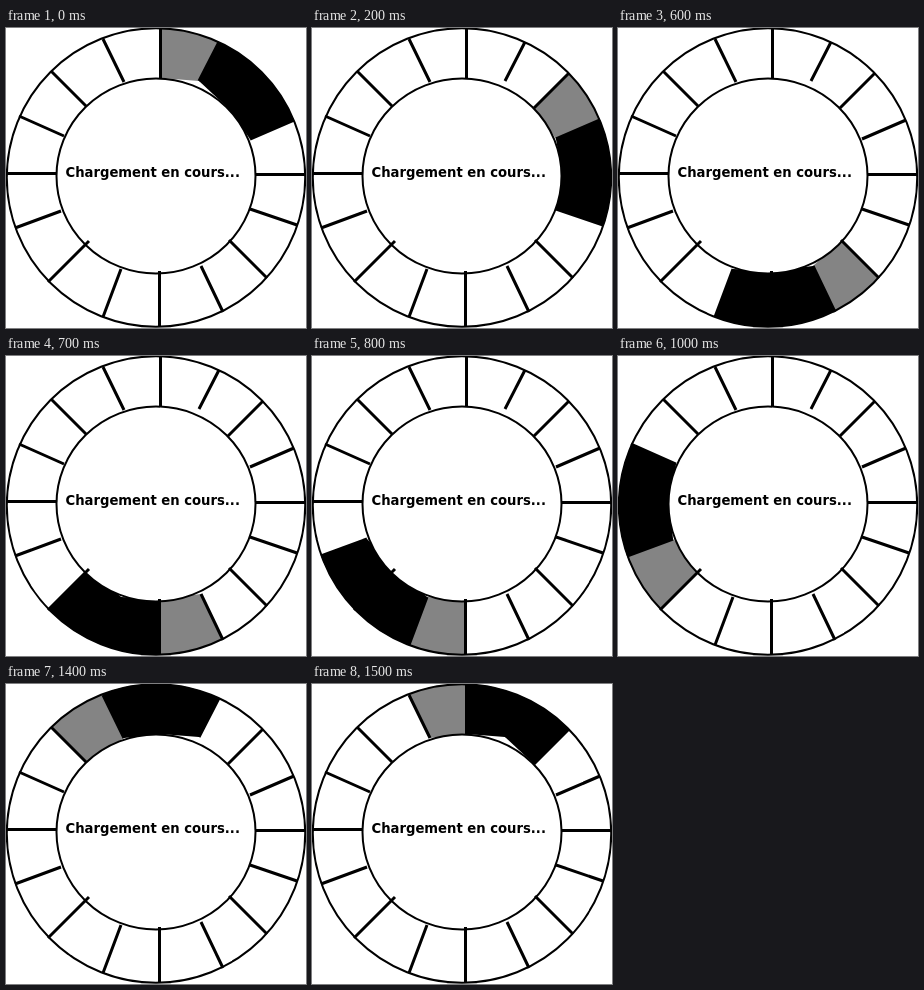
An HTML page that plays this animation: 300x300 px, repeating every 1.6 s.

```html
<!DOCTYPE html>
<html lang="fr">
<head>
<meta charset="utf-8">
<title>Chargement</title>
<style>
  html, body { margin: 0; width: 100%; height: 100%; overflow: hidden; background: #fff; }
  svg { display: block; width: 300px; height: 300px; }
  text { font: bold 13.2px "DejaVu Sans", sans-serif; }
</style>
</head>
<body>
<svg viewBox="0 0 300 300">
  <clipPath id="disc"><ellipse cx="150" cy="149.5" rx="149.5" ry="149.5"/></clipPath>
  <g id="wedges" clip-path="url(#disc)"></g>
  <ellipse cx="150" cy="148" rx="99.5" ry="97.5" fill="#fff" stroke="#000" stroke-width="2"/>
  <ellipse cx="150" cy="149.5" rx="149.2" ry="149.2" fill="none" stroke="#000" stroke-width="2"/>
  <path id="spokes" stroke="#000" stroke-width="3"/>
  <text x="59.5" y="149">Chargement en cours...</text>
</svg>
<script>
  // Inner and outer end of each spoke, clockwise from the top
  const spokes = [
    [154.5, 50, 154.5, 0], [193, 53, 213, 14], [222, 80, 257, 45], [244, 111, 288, 92],
    [250, 146.5, 299, 146.5], [244, 181, 291, 197], [223, 212, 261, 250], [195, 238, 217, 284],
    [153.5, 243, 153.5, 299], [115, 241, 97, 289], [83, 213, 42, 254], [55, 183, 9, 200],
    [51, 145.5, 0, 145.5], [58, 108, 13, 88], [80, 78, 45, 43], [118, 54, 97, 11]
  ];
  const count = spokes.length, step = 100;

  const beyond = ([x1, y1, x2, y2]) => [x1 + (x2 - x1) * 1.4, y1 + (y2 - y1) * 1.4];

  const wedges = spokes.map((a, i) => {
    const b = spokes[(i + 1) % count];
    const wedge = document.createElementNS("http://www.w3.org/2000/svg", "polygon");
    wedge.setAttribute("points", [a.slice(0, 2), beyond(a), beyond(b), b.slice(0, 2)].join(" "));
    document.getElementById("wedges").append(wedge);
    return wedge;
  });

  document.getElementById("spokes").setAttribute("d",
    spokes.map(([x1, y1, x2, y2]) => `M${x1} ${y1}L${x2} ${y2}`).join(""));

  const shades = ["#848484", "#000", "#000"];

  function draw(now) {
    const head = Math.floor(now / step) % count;
    wedges.forEach((wedge, i) =>
      wedge.setAttribute("fill", shades[(i - head + count) % count] || "#fff"));
  }

  const start = performance.now();
  function tick() {
    draw(performance.now() - start);
    requestAnimationFrame(tick);
  }
  tick();
</script>
</body>
</html>
```
